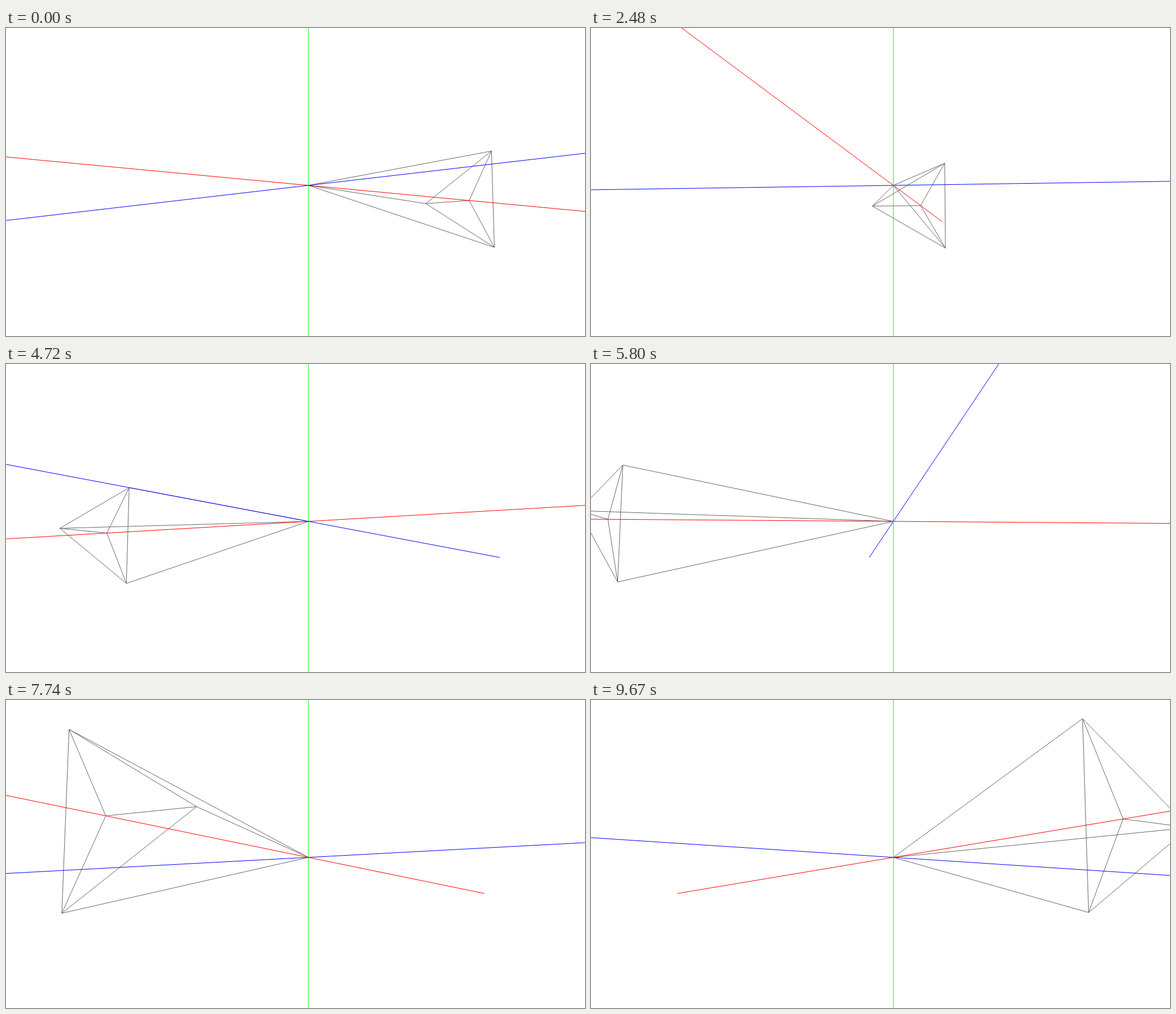
An HTML page with a canvas that plays this animation: 1026 by 546 pixels, repeating every 9.97 s.

```html
<!DOCTYPE html>
<html lang="en">
<head>
<meta charset="utf-8">
<title>Rotating cone</title>
<style>
  html, body { margin: 0; width: 100%; height: 100%; overflow: hidden; background: #fff; }
  canvas { display: block; }
</style>
</head>
<body>
<canvas id="stage" width="1026" height="546"></canvas>
<script>
const ctx = document.getElementById('stage').getContext('2d');
const LOOP = 9970;
const CENTER = { x: 535.8, y: 279 };
const FOCAL = 1155;
const DISTANCE = 2.347;   // camera to origin, in cone heights
const RADIUS = 0.25;
const FAR_DROP = 64;      // screen offset at which the far plane cuts the axes
const RAD = Math.PI / 180;
const SIN_P = Math.sin(6 * RAD), COS_P = Math.cos(6 * RAD);

// [first change, last change, number of changes]
const BURSTS = [
  [1330, 2250, 13], [2330, 3250, 13], [3330, 4260, 13], [4330, 5260, 13],
  [5330, 6270, 13], [6340, 7270, 13], [7370, 8360, 14], [8440, 9360, 13],
  [9440, 9670, 4]
];

function angleAt(t) {
  if (t < BURSTS[0][0]) return t < 450 ? 42 : t < 770 ? 43 : 44;
  let steps = 0;
  for (const [start, end, count] of BURSTS) {
    if (t < start) break;
    const gap = (end - start) / (count - 1);
    // changes fall on whole hundredths of a second
    steps += Math.min(count, 1 + Math.floor((t - start + 9.9) / gap));
  }
  return Math.floor(45 + 2.36 * steps);
}

function line(a, b, color) {
  ctx.strokeStyle = color;
  ctx.beginPath();
  ctx.moveTo(a.x, a.y);
  ctx.lineTo(b.x, b.y);
  ctx.stroke();
}

function drawCone(theta) {
  const c = Math.cos(theta), s = Math.sin(theta);
  const project = (along, side, up) => {
    const x = along * c - side * s;
    const z = along * s + side * c;
    const scale = FOCAL / (DISTANCE + z * COS_P + up * SIN_P);
    return {
      x: CENTER.x + x * scale,
      y: CENTER.y + (z * SIN_P - up * COS_P) * scale
    };
  };
  const tip = project(0, 0, 0);
  const hub = project(1, 0, 0);
  const rim = [0, 120, 240].map(d =>
    project(1, RADIUS * Math.cos(d * RAD), RADIUS * Math.sin(d * RAD)));
  rim.forEach((p, i) => {
    line(tip, p, '#666');
    line(hub, p, '#666');
    line(p, rim[(i + 1) % 3], '#666');
  });
}

function drawAxis(theta, color) {
  let dx = Math.cos(theta), dy = Math.sin(theta) * SIN_P;
  if (dy < 0) { dx = -dx; dy = -dy; }
  const reach = 6000;
  const far = Math.min(reach, FAR_DROP / Math.max(dy, 1e-6));
  const at = k => ({ x: CENTER.x + dx * k, y: CENTER.y + dy * k });
  line(at(-reach), at(far), color);
}

let shown;
function frame() {
  const angle = angleAt(performance.now() % LOOP);
  if (angle !== shown) {
    shown = angle;
    const theta = angle * RAD;
    ctx.fillStyle = '#fff';
    ctx.fillRect(0, 0, 1026, 546);
    ctx.lineWidth = 1;
    drawCone(theta);
    drawAxis(theta, '#f00');
    drawAxis(theta + Math.PI / 2, '#00f');
    line({ x: CENTER.x, y: 0 }, { x: CENTER.x, y: 546 }, '#0f0');
  }
  requestAnimationFrame(frame);
}
frame();
</script>
</body>
</html>
```
